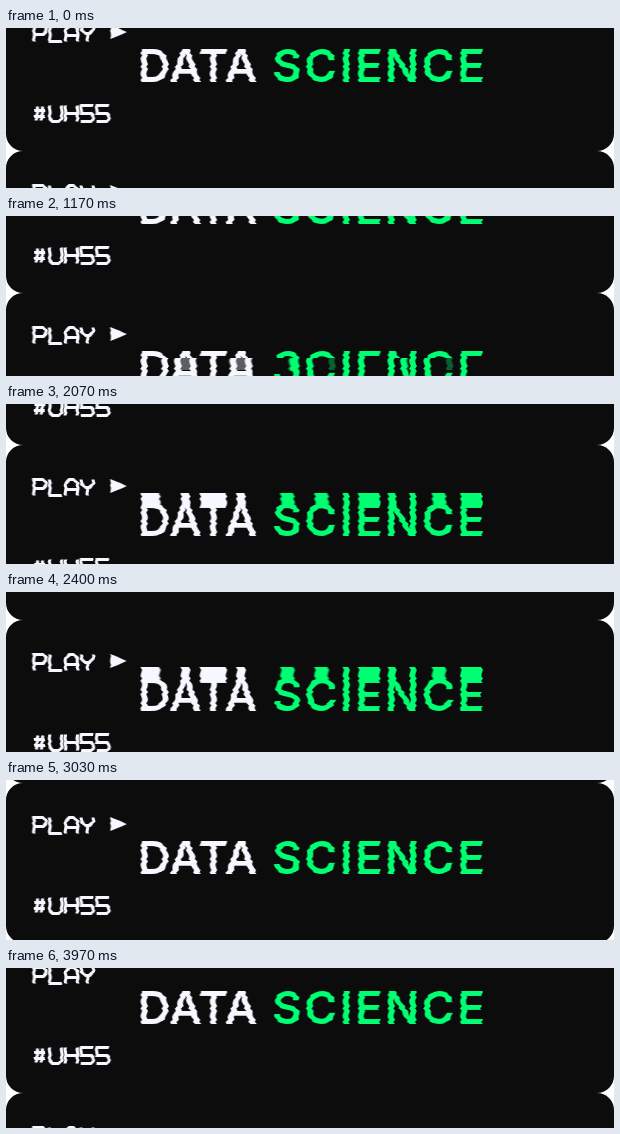
An HTML page with a canvas that plays this animation: 608 by 160 pixels, repeating every 4010 ms.

```html
<!DOCTYPE html>
<html lang="en">
<head>
<meta charset="utf-8">
<title>Data science</title>
<style>
html, body { margin: 0; width: 608px; height: 160px; overflow: hidden; background: #fff; }
canvas { display: block; }
</style>
</head>
<body>
<canvas id="stage" width="608" height="160" role="img" aria-label="PLAY, DATA SCIENCE, #UH55"></canvas>
<script>
const W = 608, H = 160, LOOP = 4010;
const WHITE = '#f7f8ff', GREEN = '#00ff72';
const ctx = document.getElementById('stage').getContext('2d');

// Square monitor lettering on a 12 by 16 grid
const GLYPHS = {
  P: 'M0 16V0H9L12 3V6L9 9H0',
  L: 'M0 0V16H12',
  A: 'M0 16V4L4 0H8L12 4V16M0 10H12',
  Y: 'M0 0V4L4 8H8L12 4V0M6 8V16',
  '#': 'M4 1L2 15M9 1L7 15M0 5H11M0 11H11',
  U: 'M0 0V13L3 16H9L12 13V0',
  H: 'M0 0V16M12 0V16M0 8H12',
  5: 'M12 0H0V8H10L12 10V14L10 16H0'
};

function makeLayer() {
  const canvas = document.createElement('canvas');
  canvas.width = W;
  canvas.height = H;
  return canvas.getContext('2d');
}

function monitorText(g, text, x, y, pitch) {
  g.strokeStyle = WHITE;
  g.lineWidth = 3.1;
  [...text].forEach((char, i) => {
    g.save();
    g.translate(x + i * pitch, y);
    g.stroke(new Path2D(GLYPHS[char]));
    g.restore();
  });
}

function titleWord(g, word, x, color, spacing) {
  g.font = '600 45px Inter, Roboto, sans-serif';
  g.letterSpacing = spacing + 'px';
  g.fillStyle = color;
  g.fillText(word, x, 91);
}

const labels = makeLayer();
monitorText(labels, 'PLAY', 28, 34.5, 15.8);
monitorText(labels, '#UH55', 28, 114.5, 15.7);

const arrow = makeLayer();
arrow.fillStyle = WHITE;
arrow.fill(new Path2D('M104.5 34L121 41L104.5 48Z'));

const title = makeLayer();
titleWord(title, 'DATA', 132, WHITE, 0.5);
titleWord(title, 'SCIENCE', 266.5, GREEN, 2.6);

// Rows first..last repeat the row src, mixed with the crossbar row of the A
const CROSSBAR = 80;
const SMEARS = [
  { from: 1000, to: 1400, first: 65, last: 76, src: 77, mix: 0.35 },
  { from: 1850, to: 3000, first: 48, last: 59, src: 59, grow: 0.0045 },
  { from: 2500, to: 3000, first: 72, last: 83, src: 84, mix: 0.2 },
  { from: 3200, to: 3600, first: 61, last: 79, src: CROSSBAR }
];

function smearAt(row, t) {
  return SMEARS.find(s => {
    if (t < s.from || t >= s.to) return false;
    const first = s.first - (s.grow || 0) * (t - 2070);
    return row >= first && row <= s.last;
  });
}

function drawRow(layer, src, x, y, alpha = 1) {
  ctx.globalAlpha = alpha;
  ctx.drawImage(layer.canvas, 0, src, W, 1, x, y, W, 1);
  ctx.globalAlpha = 1;
}

function drawCard(top, t) {
  const tick = Math.floor(t * 30 / 1000);
  ctx.fillStyle = '#0c0c0c';
  ctx.beginPath();
  ctx.roundRect(0, top, W, H, 17);
  ctx.fill();

  for (let row = 30; row < 136; row++) {
    const y = top + row;
    if (y < 0 || y >= H) continue;
    const shift = 0.7 * Math.sin(row * 0.9 + Math.sin(row * 0.5 + tick * 0.9));
    drawRow(labels, row, shift * 0.6, y);
    if (t % 1000 < 500) drawRow(arrow, row, shift * 0.5, y);

    const smear = smearAt(row, t);
    drawRow(title, smear ? smear.src : row, shift, y);
    if (smear && smear.mix) drawRow(title, CROSSBAR, shift, y, smear.mix);
  }
}

function frame() {
  const t = performance.now() % LOOP;
  const seam = Math.round((123.5 - t / LOOP * H + H) % H);
  ctx.fillStyle = '#fff';
  ctx.fillRect(0, 0, W, H);
  drawCard(seam - H, t);
  drawCard(seam, t);
  requestAnimationFrame(frame);
}
frame();
</script>
</body>
</html>
```
